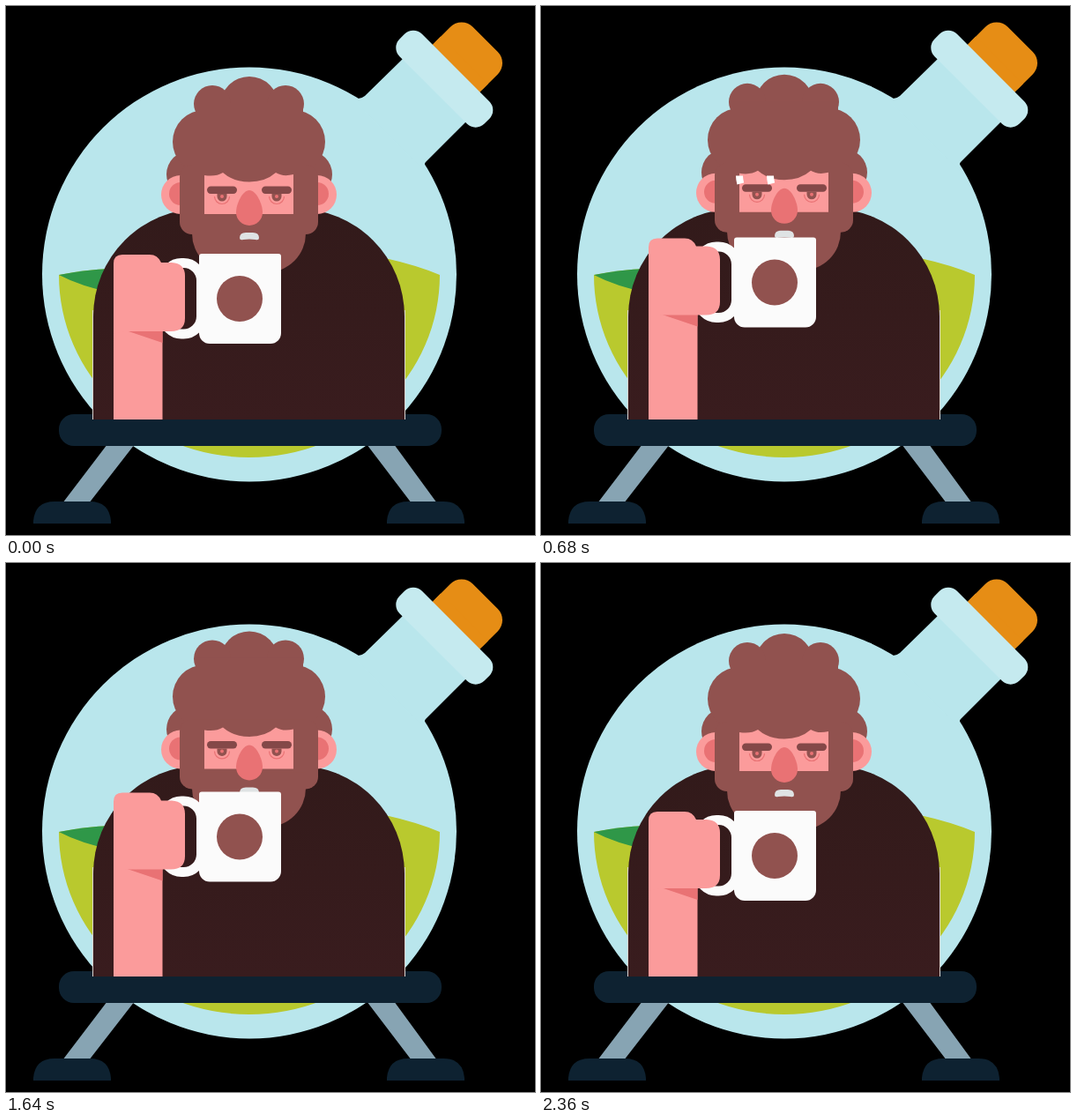
Animation of 600 by 600 pixels, one loop 2400 ms. Source, as an HTML page:

```html
<!DOCTYPE html>
<html lang="en">
<head>
<meta charset="utf-8">
<title>Coffee in a flask</title>
<style>
  html, body { margin: 0; width: 100%; height: 100%; overflow: hidden; background: #000; }
  svg { display: block; width: 100vw; height: 100vh; }
  .glass { fill: #b9e6ec; }
  .dark { fill: #0e2231; }
  .leg { fill: #87a4b3; }
  .hair { fill: #91524f; }
  .skin { fill: #fb9b9b; }
  .blush { fill: #e97274; }
  .white { fill: #fbfbfb; }
  .steam path { fill: none; stroke: #fff; stroke-width: 8; stroke-dasharray: 13 300; }
</style>
</head>
<body>
<svg viewBox="0 0 600 600">
  <defs>
    <linearGradient id="coat" x1="0" y1="0" x2="0" y2="1">
      <stop offset="0" stop-color="#321a1a"/>
      <stop offset="1" stop-color="#391c1e"/>
    </linearGradient>
    <g id="eye">
      <path d="M-8.500-1a8.500 8.500 0 0 0 17 0" fill="none" stroke="#e97274" stroke-width="1.200"/>
      <path class="hair" d="M-5.500-4h11v3a5.500 5.500 0 0 1-11 0z"/>
      <circle class="blush" r="2" cy="-1"/>
      <rect x="-17" y="-12.500" width="34" height="8.500" rx="4.200" fill="#844848"/>
    </g>
    <path id="foot" class="dark" d="M0 587v-3q2-22 24-22h40q22 0 24 22v3z"/>
  </defs>

  <!-- flask -->
  <circle class="glass" cx="276" cy="304.500" r="235"/>
  <path class="glass" d="M390 103Q400 108 407 102L452 58L523.500 129.500L476 177Q473 180 478 190z"/>
  <g transform="translate(498 82) rotate(45)">
    <rect x="-37" y="-63.500" width="76" height="60" rx="18" fill="#e68d15"/>
    <rect x="-37" y="-30" width="76" height="20" fill="#e68d15"/>
    <rect x="-68" y="-17" width="136" height="36" rx="14" fill="#c5eaef"/>
  </g>
  <path d="M60 305Q90 299 120 298L430 286Q466 294 492 305A216 207 0 0 1 60 305" fill="#b9c92e"/>
  <path d="M60 305Q90 299 120 298V325Q85 318 60 305" fill="#2f9748"/>

  <!-- stand -->
  <path class="leg" d="M115 497h31L94 564H64zM409 497h31L489 564H460z"/>
  <use href="#foot" x="31"/>
  <use href="#foot" x="432"/>
  <rect class="dark" x="60" y="463" width="434" height="36" rx="17"/>

  <path d="M99 469V352A122 122 0 0 1 221 230H330A122 122 0 0 1 452 352V469z" fill="url(#coat)"/>
  <path d="M98.500 469V345M452.500 469V345" stroke="#d9d3cf"/>

  <g id="head">
    <circle class="hair" cx="209" cy="191" r="27"/>
    <circle class="hair" cx="343" cy="191" r="27"/>
    <circle class="skin" cx="198" cy="214" r="22"/>
    <circle class="skin" cx="353" cy="214" r="22"/>
    <circle class="blush" cx="198" cy="213" r="13"/>
    <circle class="blush" cx="353" cy="213" r="13"/>
    <g class="hair">
      <circle cx="276" cy="113" r="33"/>
      <circle cx="234" cy="111" r="21"/>
      <circle cx="317" cy="111" r="21"/>
      <circle cx="225" cy="154" r="36"/>
      <circle cx="326" cy="154" r="36"/>
      <rect x="215" y="110" width="122" height="80"/>
      <rect x="197" y="180" width="157" height="79" rx="14"/>
      <path d="M211 240H340V258a44 44 0 0 1-44 44H255a44 44 0 0 1-44-44z"/>
    </g>
    <path class="skin" d="M225 192Q238 194 246 189Q258 199.500 276 199.500Q294 199.500 306 189Q314 194 326 191V236H225z"/>
    <use href="#eye" x="245" y="217"/>
    <use href="#eye" x="307" y="217"/>
    <path class="blush" d="M276 209C284 209 291 225 291 234a15 15 0 0 1-30 0C261 225 268 209 276 209"/>
    <path d="M265 263q0-6 7-6h8q7 0 7 6 0 3-4 2-7-1-14 0-4 1-4-2" fill="#dfe3e4"/>
  </g>

  <g class="steam">
    <path pathLength="104" d="M263 286C263 260 225 218 225 192.500"/>
    <path pathLength="104" d="M298 286C298 260 260 218 260 192.500"/>
  </g>

  <rect id="forearm" class="skin" x="122" width="55.500"/>
  <g id="cup">
    <rect x="179" y="291.500" width="42.500" height="80.500" rx="20" fill="none" stroke="#fbfbfb" stroke-width="11"/>
    <path class="white" d="M222 281H309q3 0 3 3V371a12 12 0 0 1-12 12H231a12 12 0 0 1-12-12V284q0-3 3-3"/>
    <circle class="hair" cx="265" cy="332" r="26"/>
    <path class="blush" d="M136 368H177.500V382z"/>
    <path class="skin" d="M122 372V292q0-10 10-10H163q9 0 13 9H188q15 1 15 15V354q0 15-16 15H137z"/>
  </g>
</svg>
<script>
  const LOOP = 2400, STEP = 40;
  const head = document.getElementById('head');
  const cup = document.getElementById('cup');
  const forearm = document.getElementById('forearm');
  const steam = document.querySelectorAll('.steam path');

  const moveY = (el, y) => el.setAttribute('transform', `translate(0 ${y})`);

  function draw(now) {
    const t = Math.floor(now % LOOP / STEP) * STEP;
    const lift = (1 - Math.cos(2 * Math.PI * t / LOOP)) / 2;
    const cupY = -30.5 * lift;

    moveY(head, -3.6 * lift);
    moveY(cup, cupY);
    forearm.setAttribute('y', 365 + cupY);
    forearm.setAttribute('height', 104 - cupY);

    // Puffs slow down slightly as they rise, then slip off the path's end.
    const rise = -4 + 0.19 * t - 0.000052 * t * t;
    for (const puff of steam) {
      puff.style.visibility = t > 0 && t < 800 ? 'visible' : 'hidden';
      puff.style.strokeDashoffset = 6.5 - rise;
    }
  }

  function tick() {
    draw(performance.now());
    requestAnimationFrame(tick);
  }
  tick();
</script>
</body>
</html>
```
